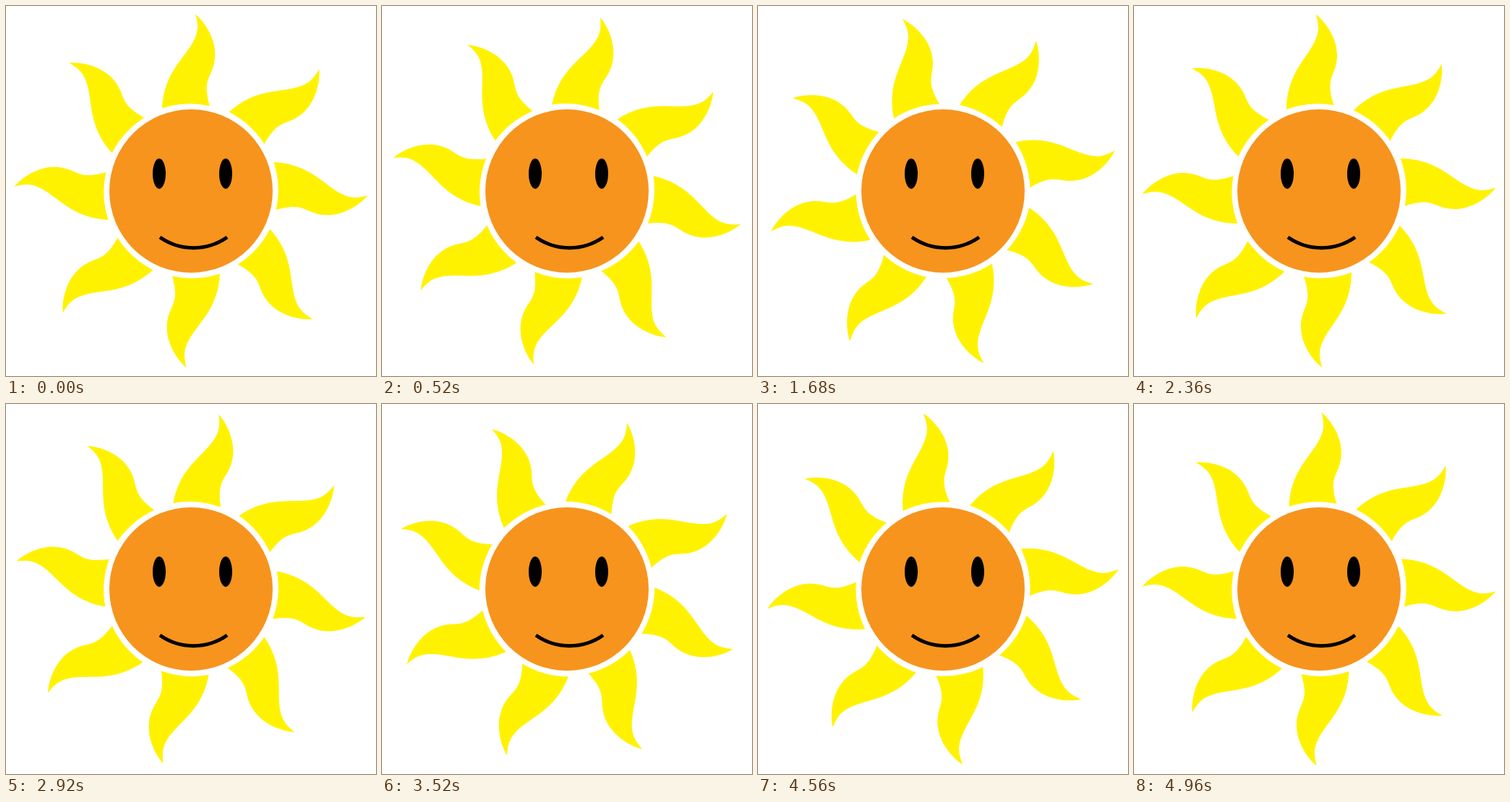
Recreate the animation shown at these times as an HTML page with a canvas. Size 512 by 512 pixels, loop 5 s.

```html
<!DOCTYPE html>
<html lang="en">
<head>
<meta charset="utf-8">
<title>Smiling sun</title>
<style>
  html, body { margin: 0; width: 100%; height: 100%; overflow: hidden; background: #fff; }
  canvas { display: block; }
</style>
</head>
<body>
<canvas id="stage" width="512" height="512"></canvas>
<script>
const ctx = document.getElementById('stage').getContext('2d');
const SIZE = 512, CENTER = SIZE / 2;
const LOOP = 5000, STEP = 40;
const RAYS = 8;

// Topmost ray at rest: right edge, base arc, left edge back to the tip.
const ray = new Path2D(
  'M262.3 11.5 C276 23 290 46 289.3 68 C288 100 270 96 282 138.3 ' +
  'Q248 131 216 141.5 C219 84 256.5 68 264.2 36 C266 28 264.5 20 262.3 11.5 Z'
);
const mouth = new Path2D('M213 320 C241 339.5 278 339.5 306 320');

function fillEllipse(x, y, rx, ry, color) {
  ctx.fillStyle = color;
  ctx.beginPath();
  ctx.ellipse(x, y, rx, ry, 0, 0, Math.PI * 2);
  ctx.fill();
}

function drawRays(angle) {
  ctx.fillStyle = '#fff200';
  for (let i = 0; i < RAYS; i++) {
    ctx.save();
    ctx.translate(CENTER, CENTER);
    ctx.rotate(angle + i * 2 * Math.PI / RAYS);
    ctx.translate(-CENTER, -CENTER);
    ctx.fill(ray);
    ctx.restore();
  }
}

function drawFace() {
  fillEllipse(CENTER, CENTER, 113, 113, '#f7941d');
  fillEllipse(212, 232, 9, 21, '#000');
  fillEllipse(304, 232, 9, 21, '#000');
  ctx.strokeStyle = '#000';
  ctx.lineWidth = 5;
  ctx.stroke(mouth);
}

function draw(time) {
  const stepped = Math.floor((time % LOOP) / STEP) * STEP;
  ctx.fillStyle = '#fff';
  ctx.fillRect(0, 0, SIZE, SIZE);
  // A quarter turn per loop is seamless thanks to the rays' symmetry.
  drawRays(stepped / LOOP * Math.PI / 2);
  drawFace();
}

const start = performance.now();
function tick() {
  draw(performance.now() - start);
  requestAnimationFrame(tick);
}
tick();
</script>
</body>
</html>
```
